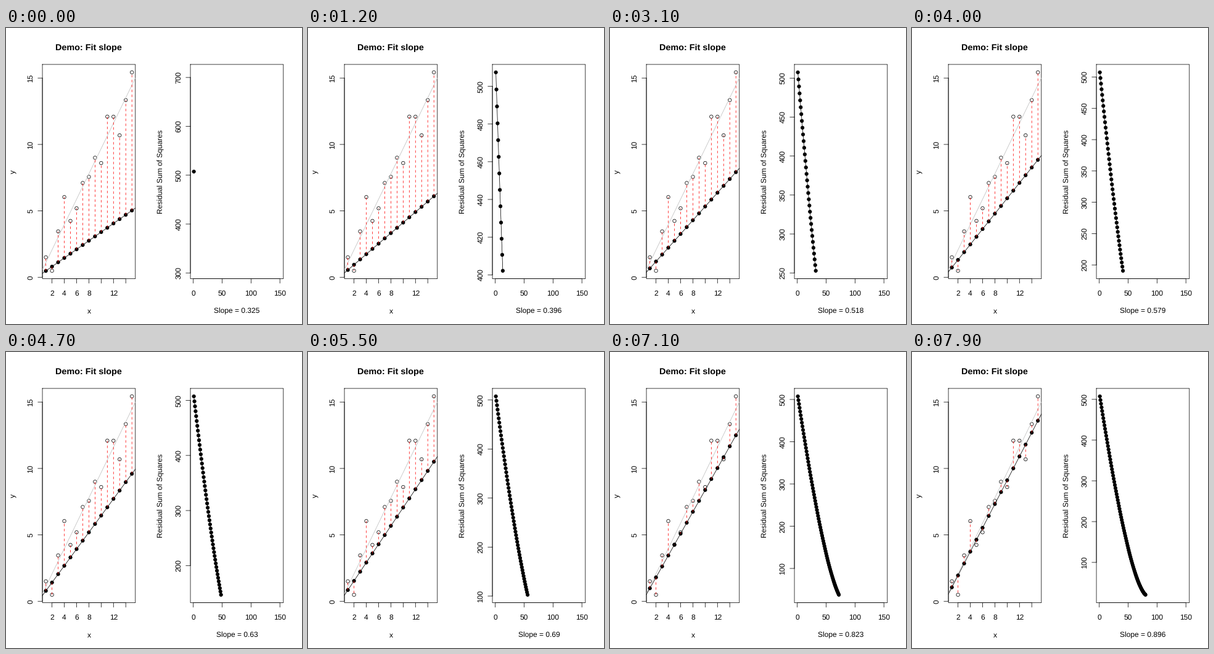
A matplotlib script for the animation above (8000 ms loop, 480x480 px).

```python
import numpy as np
import matplotlib.pyplot as plt
from matplotlib.animation import FuncAnimation
from matplotlib.patches import PathPatch
from matplotlib.path import Path

plt.rcParams["font.family"] = "Liberation Sans"
plt.rcParams["text.hinting"] = "none"

SIZE, FRAMES, STEPS = 480, 80, 150
PT = 72 / 96                      # points per pixel
WIDTH = 0.75                      # line width in pixels
RADIUS = 2.7                      # dot radius in pixels
LINE = 14.4                       # height of one margin line
TOP, BOTTOM = 59.04, 406.56
LEFT_BOX, RIGHT_BOX = (59.04, 209.76), (299.04, 449.76)

x = np.arange(1, 16)
y = np.array([1.505, 0.49, 3.455, 6.04, 4.245, 5.195, 7.10, 7.56,
              9.0, 8.6, 12.095, 12.09, 10.69, 13.34, 15.43])
best, icept = np.polyfit(x, y, 1)

# the trial line turns by a constant angle each step
slopes = np.tan(np.linspace(np.pi / 10, 0.35 * np.pi, STEPS))
rss = np.array([np.sum((y - icept - b * x) ** 2) for b in slopes])

fig = plt.figure(figsize=(SIZE / 96, SIZE / 96), dpi=96, facecolor="white")
ax = fig.add_axes([0, 0, 1, 1])
ax.set_xlim(0, SIZE)
ax.set_ylim(SIZE, 0)
ax.axis("off")


def scale(lo, hi, p0, p1):
    """Map data to pixels, with 4% padding at both ends."""
    pad = 0.04 * (hi - lo)
    lo, hi = lo - pad, hi + pad
    return lambda v: p0 + (np.asarray(v) - lo) / (hi - lo) * (p1 - p0)


def line(xs=(), ys=(), color="black", **kw):
    return ax.plot(xs, ys, color=color, lw=WIDTH * PT, snap=False, **kw)[0]


def circles(xs, ys):
    ring = Path.unit_circle()
    return Path.make_compound_path(
        *(Path(ring.vertices * RADIUS + p, ring.codes) for p in zip(xs, ys)))


def dots(xs, ys, fill="black", **kw):
    return ax.add_patch(PathPatch(circles(xs, ys), fc=fill, ec="black",
                                  lw=WIDTH * PT, snap=False, **kw))


def text(px, py, s, size=12, **kw):
    return ax.text(px, py, s, fontsize=size * PT, ha="center", va="baseline",
                   rotation_mode="anchor", **kw)


def box(left, right):
    line([left, right, right, left, left], [TOP, TOP, BOTTOM, BOTTOM, TOP])


def x_title(box_x, s):
    return text(sum(box_x) / 2, BOTTOM + 3.9 * LINE, s)


def y_title(box_x, s):
    return text(box_x[0] - 3.1 * LINE, (TOP + BOTTOM) / 2, s, rotation=90)


def x_axis(ticks, to_px, shown):
    px = to_px(ticks)
    line([px[0], px[-1]], [BOTTOM, BOTTOM])
    for t, p in zip(ticks, px):
        line([p, p], [BOTTOM, BOTTOM + LINE / 2])
        if t in shown:
            text(p, BOTTOM + 1.9 * LINE, str(t))


def y_axis(ticks, to_px, left):
    px = to_px(ticks)
    made = [line([left, left], [px[0], px[-1]])]
    for t, p in zip(ticks, px):
        made.append(line([left - LINE / 2, left], [p, p]))
        made.append(text(left - 1.1 * LINE, p, f"{t:g}", rotation=90))
    return made


def pretty(lo, hi, n=5):
    """Round tick values inside the padded range."""
    pad = 0.04 * (hi - lo)
    lo, hi = lo - pad, hi + pad
    cell = (hi - lo) / n
    base = 10 ** np.floor(np.log10(cell))
    unit = base
    for mult, bias in ((2, 0.8), (5, 1.7), (10, 0.8)):
        if mult * base - cell < bias * (cell - unit):
            unit = mult * base
    return np.arange(np.ceil(lo / unit), np.floor(hi / unit) + 1) * unit


# left panel
lx = scale(1, 15, *LEFT_BOX)
ly = scale(y.min(), y.max(), BOTTOM, TOP)
ends = np.array([0.44, 15.56])
box(*LEFT_BOX)
x_axis(range(2, 15, 2), lx, (2, 4, 6, 8, 12))
y_axis(range(0, 16, 5), ly, LEFT_BOX[0])
text(134.4, 35.6, "Demo: Fit slope", 14.4, weight="bold")
x_title(LEFT_BOX, "x")
y_title(LEFT_BOX, "y")
dots(lx(x), ly(y), "none", zorder=3)
line(lx(ends), ly(icept + best * ends), "#bebebe", zorder=3)
trial = line(zorder=4)
fitted = dots(lx(x), ly(x), zorder=5)
# dash lengths count in line widths
gaps = [line(color="red", dashes=(4 / WIDTH, 4 / WIDTH),
             dash_capstyle="butt", zorder=6) for _ in x]

# right panel
rx = scale(1, STEPS, *RIGHT_BOX)
box(*RIGHT_BOX)
x_axis(range(0, 151, 50), rx, (0, 50, 100, 150))
y_title(RIGHT_BOX, "Residual Sum of Squares")
slope_label = x_title(RIGHT_BOX, "")
trace = line(zorder=4)
marks = dots([0], [0], zorder=5)
axis_parts = []


def update(i):
    b = slopes[i]
    fit = ly(icept + b * x)
    trial.set_data(lx(ends), ly(icept + b * ends))
    fitted.set_path(circles(lx(x), fit))
    for gap, px, p0, p1 in zip(gaps, lx(x), fit, ly(y)):
        gap.set_data([px, px], [p0, p1])

    seen = rss[:i + 1]
    lo, hi = seen.min(), seen.max()
    if i == 0:
        lo, hi = 0.6 * lo, 1.4 * hi
    ry = scale(lo, hi, BOTTOM, TOP)
    px = rx(np.arange(1, i + 2))
    trace.set_data(px, ry(seen))
    marks.set_path(circles(px, ry(seen)))
    slope_label.set_text(f"Slope = {round(b, 3):g}")

    for part in axis_parts:
        part.remove()
    axis_parts[:] = y_axis(pretty(lo, hi), ry, RIGHT_BOX[0])
    return []


anim = FuncAnimation(fig, update, frames=FRAMES, interval=100,
                     init_func=lambda: update(0), repeat=True,
                     repeat_delay=0, blit=False)
plt.show()
```
